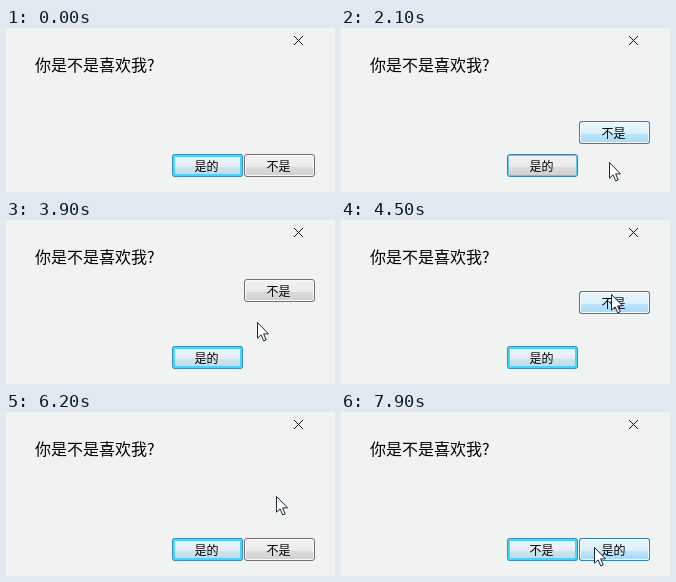
Animation of 329 by 164 pixels, one loop 8000 ms. Source, as an HTML page:

```html
<!DOCTYPE html>
<html lang="zh-CN">
<head>
<meta charset="utf-8">
<title>你是不是喜欢我?</title>
<style>
  html, body { margin: 0; width: 100%; height: 100%; overflow: hidden; background: #f1f3f3; }
  #stage { position: relative; width: 329px; height: 164px; overflow: hidden; color: #000;
    font-family: "Noto Sans CJK SC", "Noto Sans CJK", sans-serif; font-weight: 300; }
  #stage > * { position: absolute; }
  #question { left: 29px; top: 24px; font-size: 16px; line-height: 24px; white-space: nowrap; }
  .button { top: 126px; width: 71px; height: 23px; }
  .button > * { position: absolute; inset: 0; box-sizing: border-box; border-radius: 3px; }
  .plain { border: 1px solid #707070; box-shadow: inset 0 0 0 1px #fafafa;
    background: linear-gradient(#f2f2f2, #ebebeb 55%, #dddddd 55%, #cfcfcf); }
  .blue { border: 1px solid #3c7fb1; box-shadow: inset 0 0 0 1px #f4fbff;
    background: linear-gradient(#eaf6fd, #d9f0fc 55%, #bee6fd 55%, #a7d9f5); }
  #left .plain { border-color: #3c7fb1; box-shadow: inset 0 0 0 1px #62c8ee; }
  #left .blue { border-color: #3c8fc4; box-shadow: inset 0 0 0 2px #46d4fa;
    background: linear-gradient(#f0f6fa, #e2eef5 55%, #cde2ee 55%, #bbdcee); }
  .button > .label { left: -2px; font-size: 12px; line-height: 24px; text-align: center; }
  #left { left: 166px; }
  #right { left: 238px; }
  #close { left: 287px; top: 7px; }
  #cursor { left: 0; top: 0; overflow: visible; }
</style>
</head>
<body>
<div id="stage">
  <div id="question">你是不是喜欢我?</div>
  <svg id="close" width="12" height="12"><path d="M1 1L10 10M10 1L1 10" stroke="#111" fill="none"/></svg>
  <div id="left" class="button"><div class="plain"></div><div class="blue"></div><div class="label"></div></div>
  <div id="right" class="button"><div class="plain"></div><div class="blue"></div><div class="label"></div></div>
  <svg id="cursor" width="13" height="20">
    <path d="M.5 .5V16.2L4.1 12.9L6.7 18.9L9.2 17.8L6.6 11.9H11.5Z" fill="#fff" stroke="#20243a" stroke-linejoin="round"/>
  </svg>
</div>
<script>
const LOOP = 8000, STEP = 100, ENTER = 900, SWAP = 6500;
const LOW = 126, RISE = 67, SLIDE = 570;

const point = (x, y) => ({ x, y });
const entry = point(297, 53), below = point(268, 134), middle = point(271, 101);
const above = point(270, 74), onButton = point(271, 135), onLabel = point(253, 135);

const mix = (a, b, p) => a + (b - a) * p;
const blend = (a, b, p) => point(mix(a.x, b.x, p), mix(a.y, b.y, p));
const ramp = (t, start, length) => Math.min(1, Math.max(0, (t - start) / length));
// Lights up quickly, then dies away slowly
const flash = (t, on, off) => ramp(t, on, 200) * (1 - ramp(t, off, 900));

// Bézier curve of any degree
function curve(points, p) {
  while (points.length > 1) points = points.slice(1).map((b, i) => blend(points[i], b, p));
  return points[0];
}

function pointerAt(t) {
  if (t < 3200) return curve([entry, point(226, 80), point(270, 106), below], ramp(t, ENTER, 1000));
  if (t < 4100) return curve([below, point(135, 140), point(220, 98), middle], ramp(t, 3200, 800));
  if (t < 6100) return blend(middle, above, ramp(t, 4100, 300));
  if (t < 7700) return blend(above, onButton, ramp(t, 6100, 600));
  return blend(onButton, onLabel, ramp(t, 7700, 200));
}

const find = selector => document.querySelector(selector);
const cursor = find('#cursor'), right = find('#right');
const leftBlue = find('#left .blue'), rightBlue = find('#right .blue');
const leftLabel = find('#left .label'), rightLabel = find('#right .label');

function draw() {
  const t = Math.floor(performance.now() % LOOP / STEP) * STEP;
  const { x, y } = pointerAt(t);
  cursor.style.visibility = t < ENTER ? 'hidden' : 'visible';
  cursor.style.transform = `translate(${Math.round(x)}px, ${Math.round(y)}px)`;

  const raised = ramp(t, 1820, SLIDE) - ramp(t, 4400, SLIDE);
  right.style.top = Math.round(LOW - RISE * raised) + 'px';

  const firstHover = flash(t, 1700, 2100);
  rightBlue.style.opacity = firstHover + flash(t, 4300, 4600) + ramp(t, 6400, 200);
  leftBlue.style.opacity = 1 - firstHover - flash(t, 6400, 6600);

  const swapped = t >= SWAP;
  leftLabel.textContent = swapped ? '不是' : '是的';
  rightLabel.textContent = swapped ? '是的' : '不是';
  requestAnimationFrame(draw);
}
draw();
</script>
</body>
</html>
```
